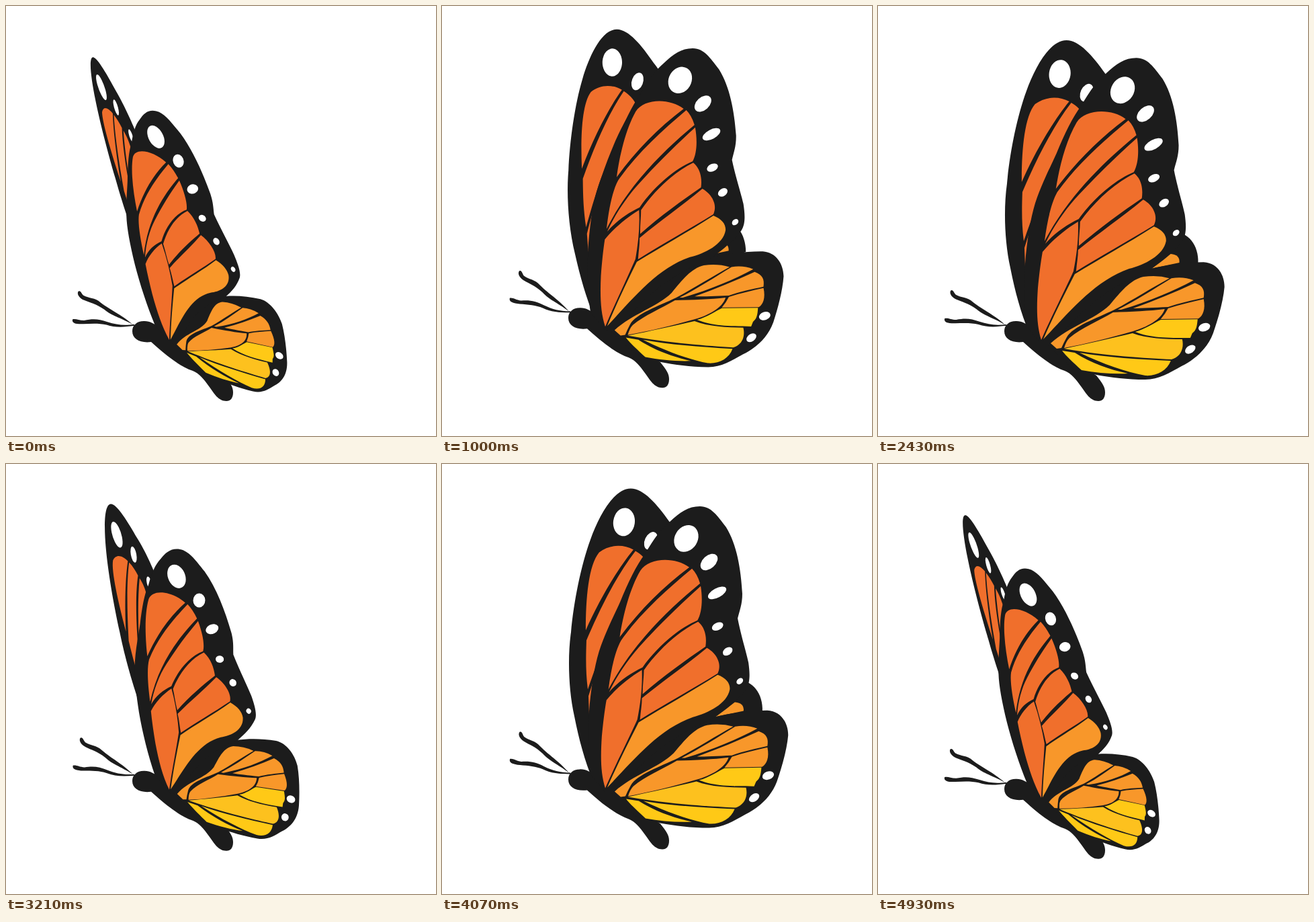
Write an HTML page that moves like this. It is 640 px wide and 640 px high and loops after 5000 ms.

```html
<!DOCTYPE html>
<html lang="en">
<head>
<meta charset="utf-8">
<title>Butterfly</title>
<style>
  html, body { margin: 0; width: 100%; height: 100%; overflow: hidden; background: #fff; }
  svg { display: block; width: 100%; height: 100%; fill: #1c1c1c; }
  .deep { fill: #f06f2c; }
  .light { fill: #f8972a; }
  .gold { fill: #fdc11e; }
  .sun { fill: #ffc916; }
  .spots { fill: #fff; }
</style>
</head>
<body>
<svg viewBox="0 0 640 640">
  <g id="bug">
    <g id="far">
      <path d="M440 320C462 322 478 340 477 368L400 400 380 380Z"/>
      <path class="light" d="M406 376L436 354Q450 355 449 367Z"/>
      <path d="M281 36C300 36 320 59 339 86C350 98 364 125 369 146C360 200 300 300 245 475L225 472C212 440 204 410 197 375C188 335 187 285 192 250C196 205 207 150 221 112C234 76 256 36 281 36Z"/>
      <g class="deep">
        <path d="M214 247C214 200 218 150 234 131C250 119 270 119 285 127C262 155 235 200 214 247Z"/>
        <path d="M288 129C297 134 303 141 307 148C277 185 250 240 217 335C214 310 214 290 215 262C235 215 260 165 288 129Z"/>
        <path d="M310 152C317 160 320 168 319 180C290 230 250 300 219 372L218 345C235 290 268 210 310 152Z"/>
      </g>
      <g class="spots">
        <ellipse cx="271" cy="86" rx="16" ry="21" transform="rotate(8 271 86)"/>
        <ellipse cx="311" cy="114" rx="9" ry="14" transform="rotate(25 311 114)"/>
        <ellipse cx="339" cy="157" rx="8" ry="11" transform="rotate(20 339 157)"/>
      </g>
    </g>
    <path d="M205 454C222 453 232 470 245 478C262 488 290 512 325 535C334 546 338 552 338 560C338 569 334 573 328 573C316 573 310 562 302 551C294 540 288 532 278 528C256 520 236 503 216 485C200 487 188 481 188 469C188 460 195 454 205 454Z"/>
    <g id="feelers">
      <path d="M115 399C119 397 119 402 122 406C130 412 138 411 146 420C160 434 172 440 189 459C170 445 160 442 150 431C138 420 130 418 122 413C117 410 112 404 115 399Z"/>
      <path d="M101 439C106 438 110 442 118 443C132 442 140 444 152 450C165 456 175 459 191 459L191 461C175 461 162 460 150 454C140 450 128 449 116 448C106 447 99 445 101 439Z"/>
    </g>
    <g id="near">
      <path d="M240 478C290 425 340 392 406 376C430 370 458 366 485 366C505 367 516 384 516 403C514 425 506 452 499 472C490 496 470 512 452 521C434 531 418 541 398 541C370 541 348 538 325 534L290 525Z"/>
      <path d="M243 488L221 461C217 430 217 390 220 357C224 320 229 292 237 270C246 245 258 222 266 204C278 175 290 150 303 133C316 110 328 95 340 85C355 71 368 62 385 62C402 62 411 76 424 93C440 119 446 155 448 192C448 208 444 217 441 229C446 255 454 280 457 295C459 310 460 325 453 335C440 352 424 364 406 377C350 400 300 435 262 488Z"/>
      <g class="deep">
        <path d="M265 257C270 225 280 185 296 158C309 138 348 137 369 153C330 182 295 217 265 257Z"/>
        <path d="M373 155Q381 163 385 177C340 214 285 265 248 335C252 305 258 278 267 262C296 221 337 185 373 155Z"/>
        <path d="M386 181C389 200 388 220 381 232C350 245 318 275 299 302C280 311 262 324 249 339C260 315 280 286 300 265C328 235 358 206 386 181Z"/>
        <path d="M382 234C393 243 395 258 393 271C365 290 330 315 299 342C299 328 301 316 301 306C322 277 350 250 382 234Z"/>
        <path d="M395 273C410 281 418 298 411 311C372 335 330 358 295 380C296 368 298 358 298 348C330 322 362 300 395 273Z"/>
        <path d="M298 306C299 330 296 355 291 380C274 417 256 452 243 482C236 460 236 435 238 405C240 385 242 368 245 351C258 335 278 318 298 306Z"/>
      </g>
      <g class="light">
        <path d="M411 313C424 318 430 326 429 335C425 356 397 370 374 376C322 394 284 442 246 481C260 449 276 417 293 384C330 361 372 338 411 313Z"/>
        <path d="M257 487C285 462 322 452 345 430C362 410 375 393 395 388Q416 385 434 390C410 403 380 422 352 437C325 450 290 462 281 478Q276 487 273 494L266 495Z"/>
        <path d="M437 390Q455 387 470 393C440 409 405 424 362 437L357 437C384 423 411 406 437 390Z"/>
        <path d="M472 397C484 401 487 408 485 419C468 423 448 427 432 433C410 434 392 435 380 435C412 423 442 411 472 397Z"/>
        <path d="M485 421C488 436 484 446 477 450L421 451Q428 443 432 435C450 429 468 425 485 421Z"/>
        <path d="M277 494Q280 484 285 479C303 464 328 454 350 441C378 440 404 439 427 436C422 452 400 463 380 469C345 479 310 488 277 494Z"/>
      </g>
      <g class="gold">
        <path d="M277 495C310 488 350 479 379 472C400 480 428 481 453 481C456 494 451 507 437 511C400 509 340 506 277 495Z"/>
      </g>
      <g class="sun">
        <path d="M383 470C398 466 412 456 421 452L476 451C475 462 474 467 468 472L465 479C430 479 405 479 383 470Z"/>
        <path d="M300 501C340 508 390 511 436 513C430 528 415 536 398 535C370 530 335 518 300 501Z"/>
        <path d="M274 498L293 501C318 517 345 526 372 532C350 533 325 531 303 527C290 515 280 506 274 498Z"/>
      </g>
      <g class="spots">
        <ellipse cx="364.5" cy="110" rx="17" ry="21" transform="rotate(32 364.5 110)"/>
        <ellipse cx="398.5" cy="145" rx="15" ry="9.5" transform="rotate(-42 398.5 145)"/>
        <ellipse cx="410.5" cy="191" rx="15" ry="7" transform="rotate(-28 410.5 191)"/>
        <ellipse cx="411" cy="241" rx="9" ry="5.5" transform="rotate(-25 411 241)"/>
        <ellipse cx="426" cy="278" rx="8" ry="5.5" transform="rotate(-35 426 278)"/>
        <ellipse cx="444" cy="322.5" rx="5.5" ry="4" transform="rotate(-40 444 322.5)"/>
        <ellipse cx="486" cy="463" rx="9" ry="6" transform="rotate(-20 486 463)"/>
        <ellipse cx="465" cy="496" rx="8.5" ry="5.5" transform="rotate(-35 465 496)"/>
      </g>
    </g>
  </g>
</svg>
<script>
const LOOP = 5000, STEP = LOOP / 70;
const shutTimes = [0, 1610, 3335, LOOP - 70];
const bobTimes = [0, 880, 2430, 3700, LOOP];
const swayTimes = [0, 1280, 2700, 3900, LOOP];

// Shut pose as a linear map around a pivot, plus a shift
const wings = [
  { id: 'near', lead: 0, shut: [.696, .164, .281, .866], pivot: [243, 482], shift: [0, 0] },
  { id: 'far', lead: .2, shut: [.3355, .11, .298, .912], pivot: [271, 86], shift: [-129, 20] }
];

const place = (id, transform) => document.getElementById(id).setAttribute('transform', transform);

// Which span of the times holds t, and how far into it t lies
function locate(times, t) {
  let i = 0;
  while (i < times.length - 2 && t >= times[i + 1]) i++;
  return [i, Math.min(1, (t - times[i]) / (times[i + 1] - times[i]))];
}

// 0 at even times, 1 at odd times, cosine between
function wave(times, t) {
  const [i, s] = locate(times, t);
  return (1 - Math.cos((i + s) * Math.PI)) / 2;
}

// 1 when shut, 0 when spread: the wing turns evenly and is seen in projection
function fold(t, lead) {
  const [, s] = locate(shutTimes, t);
  return 1 - Math.sin((s + lead * s * (1 - s)) * Math.PI);
}

function foldWing({ id, lead, shut, pivot: [px, py], shift: [sx, sy] }, t) {
  const q = fold(t, lead);
  const [a, b, c, d] = [1, 0, 0, 1].map((open, i) => open + q * (shut[i] - open));
  place(id, `translate(${px + q * sx} ${py + q * sy}) matrix(${a} ${b} ${c} ${d} 0 0) translate(${-px} ${-py})`);
}

function draw(t) {
  const depth = t < bobTimes[2] ? 20 : 18;
  place('bug', `translate(0 ${15 - depth * wave(bobTimes, t)})`);
  place('feelers', `rotate(${8.7 * wave(swayTimes, t) - 7.9} 190 460)`);
  wings.forEach(wing => foldWing(wing, t));
}

const start = performance.now();
function tick(now) {
  const t = Math.max(0, now - start) % LOOP;
  draw(Math.floor((t + 5) / STEP) * STEP % LOOP);
  requestAnimationFrame(tick);
}
draw(0);
requestAnimationFrame(tick);
</script>
</body>
</html>
```
